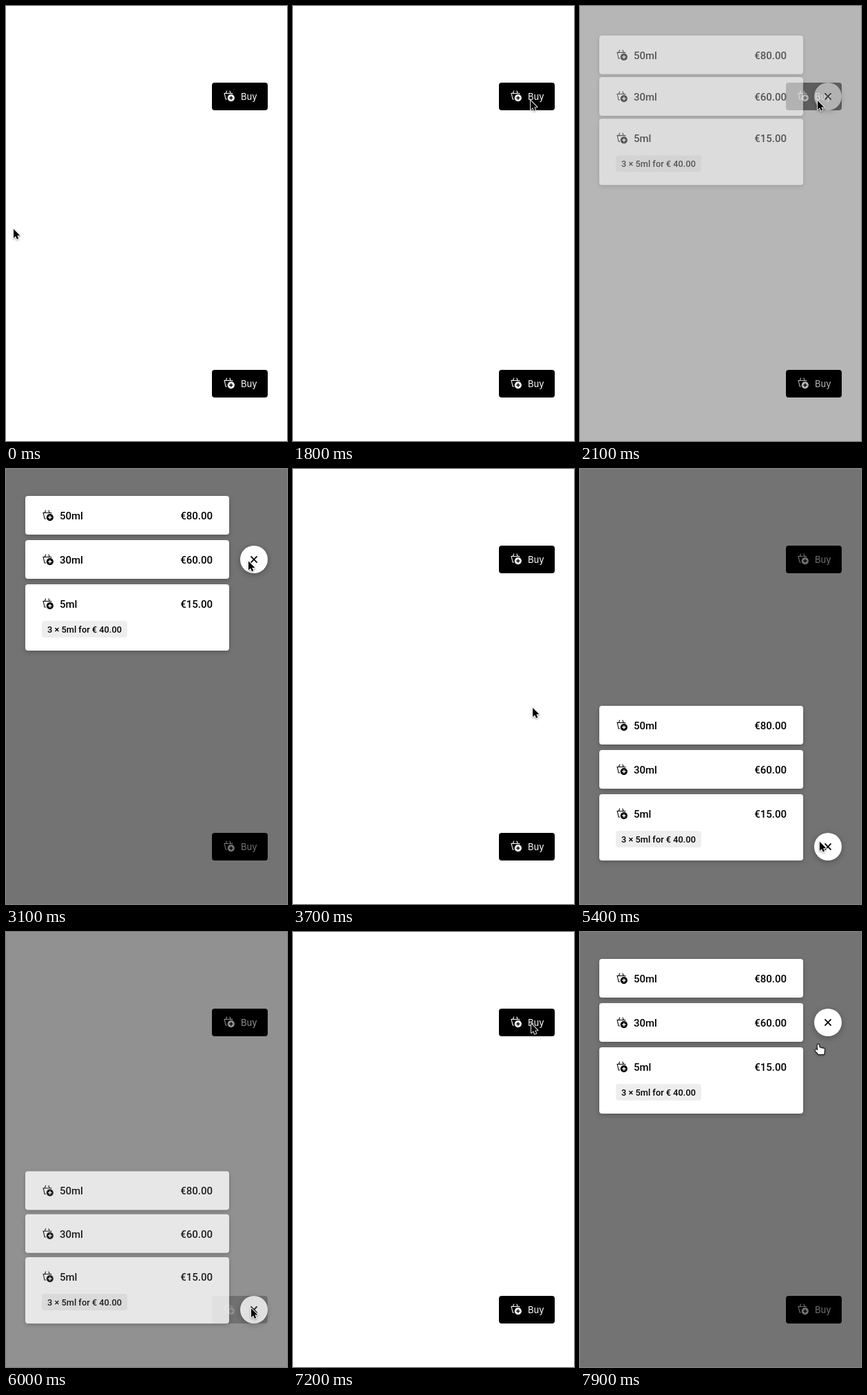
An HTML page with a canvas that plays this animation: 408x630 px, repeating every 8000 ms.

```html
<!DOCTYPE html>
<html lang="en">
<head>
<meta charset="utf-8">
<title>Buy menu</title>
<style>
html, body { margin: 0; width: 100%; height: 100%; overflow: hidden; background: #fff; }
canvas { display: block; }
</style>
</head>
<body>
<canvas id="stage" width="408" height="630"></canvas>
<script>
const W = 408, H = 630, LOOP = 8000, STEP = 100, FADE = 280;
const stage = document.getElementById('stage').getContext('2d');
const layer = document.createElement('canvas');
layer.width = W;
layer.height = H;
const g = layer.getContext('2d');

// y: button top, anchor: row that stays put while the gaps open, spans: open and close times
const menus = [
  { y: 111, anchor: 1, spans: [[1956, 3416], [7356, LOOP]] },
  { y: 527, anchor: 2, spans: [[4556, 5916]] }
];
const rows = [['50ml', '€80.00'], ['30ml', '€60.00'], ['5ml', '€15.00', '3 × 5ml for € 40.00']];

// pointer moves: start, end, x, y
const home = [10, 322];
const moves = [
  [400, 600, 213, 172], [700, 900, 336, 130], [900, 1100, 341, 535],
  [1100, 1400, 344, 138], [1700, 1800, 344, 136], [3000, 3300, 354, 131],
  [3500, 4400, 341, 535], [5300, 5900, 355, 544], [6200, 7200, 345, 132],
  [7300, 7400, 345, 134], [7800, 7900, 345, 162]
];

const arrow = new Path2D('M0 0V14.6L3.3 11.5L5.5 16.4L8 15.3L5.9 10.5H10.5Z');
const basket = new Path2D('M.4 4.5H13.2M1.2 4.5L3 13H5M12.6 4.5L12.2 6M3.4 4.2L4.7.6M10.1 4.2L8.8.6');

const clamp = v => Math.max(0, Math.min(1, v));
const smooth = v => v * v * (3 - 2 * v);
const slowDown = v => 1 - (1 - v) ** 3;

function openness(spans, t) {
  const ramp = from => smooth(clamp((t - from) / FADE));
  return Math.max(...spans.map(([from, to]) => ramp(from) * (1 - ramp(to))));
}

function pointerAt(t) {
  return moves.reduce(([x, y], [from, to, nx, ny]) => {
    const k = slowDown(clamp((t - from) / (to - from)));
    return [x + (nx - x) * k, y + (ny - y) * k];
  }, home);
}

function fade(alpha, draw) {
  if (alpha <= 0) return;
  g.clearRect(0, 0, W, H);
  draw();
  stage.globalAlpha = alpha;
  stage.drawImage(layer, 0, 0);
  stage.globalAlpha = 1;
}

function shadow(c, alpha, blur, dy) {
  c.shadowColor = `rgba(0,0,0,${alpha})`;
  c.shadowBlur = blur;
  c.shadowOffsetY = dy;
}

function box(x, y, w, h, color) {
  g.fillStyle = color;
  g.beginPath();
  g.roundRect(x, y, w, h, 4);
  g.fill();
}

function disc(x, y, r, color) {
  g.fillStyle = color;
  g.beginPath();
  g.arc(x, y, r, 0, 7);
  g.fill();
}

// plus sign, or a cross when turned
function plus(x, y, r, width, color, turn = 0) {
  g.save();
  g.translate(x, y);
  g.rotate(turn);
  g.fillStyle = color;
  g.fillRect(-r, -width / 2, 2 * r, width);
  g.fillRect(-width / 2, -r, width, 2 * r);
  g.restore();
}

function label(str, x, y, font, color, align = 'left') {
  g.font = font;
  g.textAlign = align;
  g.fillStyle = color;
  g.fillText(str, x, y);
}

function icon(x, y, ink, paper) {
  g.save();
  g.translate(x, y);
  g.strokeStyle = ink;
  g.lineWidth = 1.1;
  g.stroke(basket);
  disc(10.8, 11.1, 6, paper);
  disc(10.8, 11.1, 5.1, ink);
  plus(10.8, 11.1, 2.7, 1.4, paper);
  g.restore();
}

function button(y) {
  box(299, y, 81, 40, '#000');
  icon(316, y + 11, '#fff', '#000');
  label('Buy', 341, y + 25, '400 13px Inter, sans-serif', '#fff');
}

function menu({ y, anchor }, p) {
  const font = '500 15px Roboto, sans-serif';
  rows.forEach(([size, price, offer], i) => {
    const top = y - 8 + (i - anchor) * (56 + 8 * p) - (anchor - 1) * 48;
    shadow(g, 0.25, 6, 2);
    box(28, top, 296, offer ? 96 : 56, '#fff');
    shadow(g, 0, 0, 0);
    icon(53, top + 20, '#000', '#fff');
    label(size, 78, top + 34, font, '#000');
    label(price, 300, top + 34, font, '#000', 'right');
    if (offer) {
      box(52, top + 53, 124, 24, '#eee');
      label(offer, 60, top + 70, '500 12.8px Roboto, sans-serif', '#000');
    }
  });
  shadow(g, 0.3, 8, 2);
  disc(360, y + 20, 20, '#fff');
  shadow(g, 0, 0, 0);
  plus(360, y + 20, 6.4, 1.7, '#000', Math.PI / 4);
}

function drawArrow() {
  stage.translate(1, 1);
  stage.scale(0.9, 0.9);
  stage.lineWidth = 2;
  stage.strokeStyle = '#fff';
  stage.stroke(arrow);
  shadow(stage, 0, 0, 0);
  stage.fillStyle = '#000';
  stage.fill(arrow);
}

function drawHand() {
  const bones = new Path2D('M-2 9.5L2 13.5');
  for (let i = 0; i < 4; i++) {
    bones.moveTo(1 + 2.6 * i, i ? 6 + 0.6 * i : 2);
    bones.lineTo(1.8 + 2.1 * i, 14);
  }
  stage.lineCap = 'round';
  for (const [width, color] of [[4.4, '#000'], [2.6, '#fff']]) {
    stage.lineWidth = width;
    stage.strokeStyle = color;
    stage.stroke(bones);
    shadow(stage, 0, 0, 0);
  }
}

function pointer(t) {
  stage.save();
  stage.translate(...pointerAt(t));
  stage.lineJoin = 'round';
  shadow(stage, 0.4, 3, 1);
  (t < 7900 ? drawArrow : drawHand)();
  stage.restore();
}

function render(t) {
  const open = menus.map(m => openness(m.spans, t));
  stage.fillStyle = '#fff';
  stage.fillRect(0, 0, W, H);
  menus.forEach((m, i) => fade(1 - open[i], () => button(m.y)));
  stage.fillStyle = `rgba(0,0,0,${0.55 * Math.max(...open)})`;
  stage.fillRect(0, 0, W, H);
  menus.forEach((m, i) => fade(open[i], () => menu(m, open[i])));
  pointer(t);
}

const start = performance.now();
function tick() {
  const t = (performance.now() - start) % LOOP;
  render(Math.floor(t / STEP) * STEP);
  requestAnimationFrame(tick);
}
tick();
</script>
</body>
</html>
```
